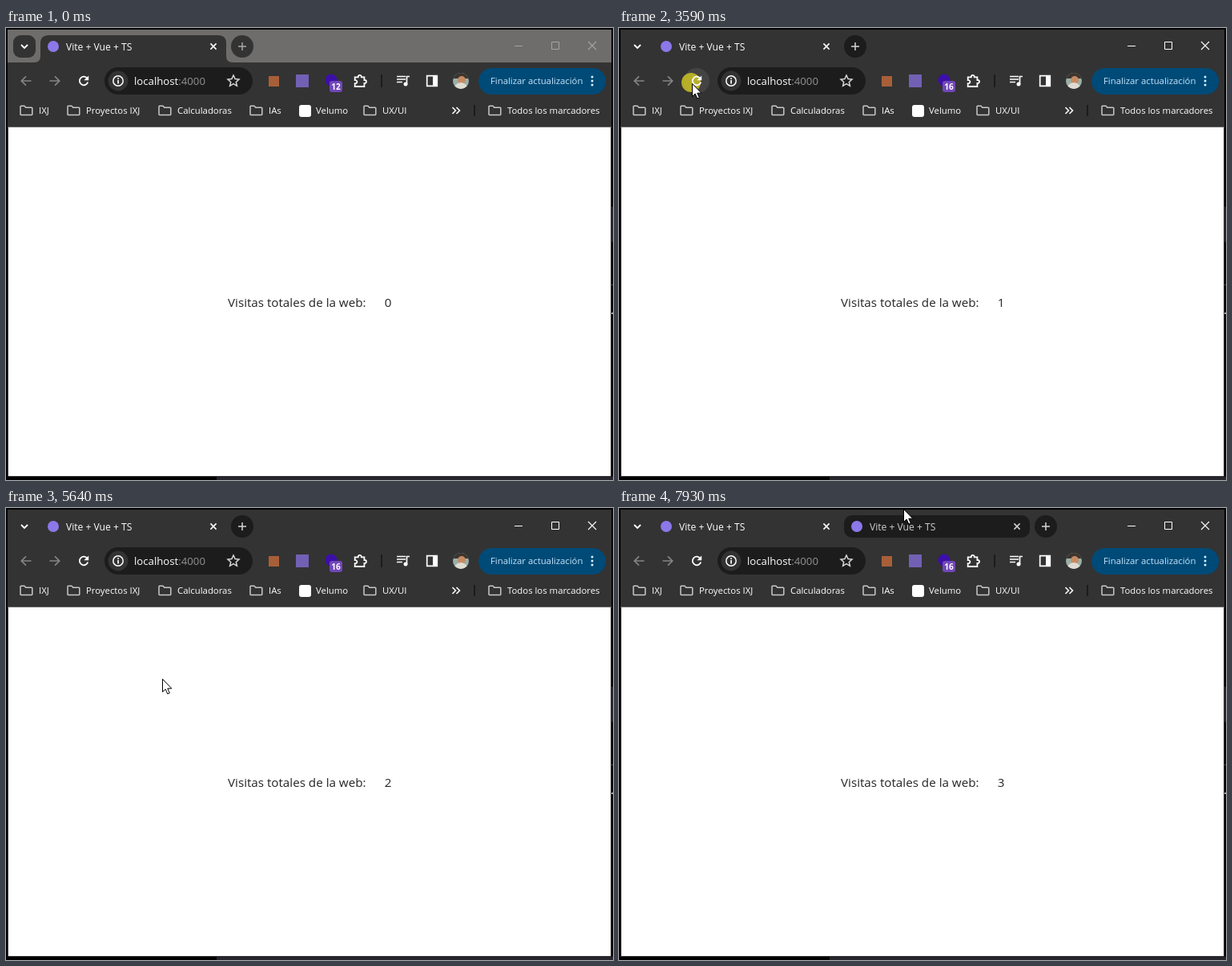
An HTML page with a canvas that plays this animation: 758 by 564 pixels, repeating every 8 s.

```html
<!DOCTYPE html>
<html lang="es">
<head>
<meta charset="utf-8">
<title>Contador de visitas</title>
<style>
html, body { margin: 0; width: 100%; height: 100%; overflow: hidden; background: #000; }
canvas { display: block; }
</style>
</head>
<body>
<canvas id="stage" width="758" height="564"></canvas>
<script>
const ctx = document.getElementById('stage').getContext('2d');
const LOOP = 8000;
const BAR = '#333333', DARK = '#1c1c1c', WHITE = '#ffffff', DIM = '#858585';
const UI = '11.35px "Open Sans", "Noto Sans", sans-serif';
const TITLE = '12.1px "Open Sans", "Noto Sans", sans-serif';
const ADDRESS = '13.2px "Open Sans", "Noto Sans", sans-serif';
const BODY = '15.2px "Open Sans", "Noto Sans", sans-serif';

// Pointer path: time, x, y
const POINTER = [
  [450, 630, 502], [640, 500, 410], [850, 346, 325], [1000, 370, 307],
  [1250, 485, 335], [1590, 212, 177], [1900, 100, 92], [2000, 80, 64],
  [2130, 91, 69], [4060, 91, 69], [4340, 104, 44], [4480, 116, 20],
  [4620, 128, 25], [4820, 128, 25], [4950, 150, 95], [5080, 185, 174],
  [5150, 190, 198], [5290, 195, 213], [6620, 195, 213], [6980, 172, 28],
  [7380, 166, 26], [7740, 166, 26], [7930, 355, 1]
];
const CLICKS = [2130, 3590, 5490, 7080];
const MENU = [
  ['Nueva pestaña a la derecha', 47], ['Añadir pestaña a lista de lectura', 75],
  ['Añadir pestaña al nuevo grupo', 103], ['Mover pestaña a otra ventana', 131],
  ['Volver a cargar', 176, 'Ctrl + R'], ['Duplicar', 204], ['Fijar', 232],
  ['Silenciar sitio', 260], ['Enviar a tus dispositivos', 305],
  ['Cerrar', 350, 'Ctrl + W'], ['Cerrar las demás pestañas', 378],
  ['Cerrar pestañas a la derecha', 406]
];
const BOOKMARKS = [
  ['IXJ', 17], ['Proyectos IXJ', 76], ['Calculadoras', 190], ['IAs', 304],
  ['UX/UI', 446], ['Todos los marcadores', 602]
];

const between = (t, a, b) => t >= a && t < b;
const clamp = v => Math.max(0, Math.min(1, v));

function rect(x, y, w, h, color) {
  ctx.fillStyle = color;
  ctx.fillRect(x, y, w, h);
}
function round(x, y, w, h, r, color) {
  ctx.fillStyle = color;
  ctx.beginPath();
  ctx.roundRect(x, y, w, h, r);
  ctx.fill();
}
function disc(x, y, r, color) {
  ctx.fillStyle = color;
  ctx.beginPath();
  ctx.arc(x, y, r, 0, Math.PI * 2);
  ctx.fill();
}
function ring(x, y, r, color, width) {
  ctx.strokeStyle = color;
  ctx.lineWidth = width;
  ctx.beginPath();
  ctx.arc(x, y, r, 0, Math.PI * 2);
  ctx.stroke();
}
function path(d, color, width, x = 0, y = 0) {
  ctx.save();
  ctx.translate(x, y);
  const shape = new Path2D(d);
  if (width) {
    ctx.strokeStyle = color;
    ctx.lineWidth = width;
    ctx.stroke(shape);
  } else {
    ctx.fillStyle = color;
    ctx.fill(shape);
  }
  ctx.restore();
}
function text(label, x, y, font = UI, color = WHITE, align = 'left') {
  ctx.font = font;
  ctx.fillStyle = color;
  ctx.textAlign = align;
  ctx.fillText(label, x, y);
}
const cross = (x, y, s, color, w) =>
  path(`M${-s} ${-s}L${s} ${s}M${s} ${-s}L${-s} ${s}`, color, w, x, y);

function pointerAt(t) {
  if (t < POINTER[0][0]) return null;
  const i = POINTER.findIndex(p => p[0] > t);
  if (i < 0) return POINTER[POINTER.length - 1].slice(1);
  const [t0, x0, y0] = POINTER[i - 1], [t1, x1, y1] = POINTER[i];
  const k = (t - t0) / (t1 - t0);
  return [x0 + (x1 - x0) * k, y0 + (y1 - y0) * k];
}

function visits(t) {
  if (t < 2800) return 0;
  if (t < 3880) return 1;
  if (t < 4040) return 0;
  if (t < 5790) return 2;
  return t < 6400 ? 0 : 3;
}

function stateAt(t) {
  const loading = between(t, 2270, 2700) || between(t, 3730, 3960) || between(t, 5790, 6250);
  return {
    focused: t >= 2130,
    loading,
    blank: between(t, 5790, 6130),
    hover: between(t, 2130, 4230),
    badge: t < 2270 ? '12' : loading || between(t, 5790, 6400) ? '' : '16',
    split: t < 5790 ? 0 : 1 - (1 - clamp((t - 5790) / 260)) ** 2,
    second: between(t, 5790, 7100),
    menu: between(t, 4820, 5490) ? 1 : between(t, 5490, 5640) ? 0.65 * (1 - (t - 5490) / 150) : 0,
    row: t < 5050 ? 0 : t < 5140 ? 176 : 204,
    count: visits(t)
  };
}

function drawFrame() {
  rect(0, 0, 758, 564, '#000');
  rect(263, 560, 495, 4, '#25252b');
  rect(756, 223, 2, 44, '#202026');
  rect(756, 320, 2, 1, '#44444a');
  rect(756, 355, 2, 2, '#a8a8a8');
}

function drawTab(x, active, focused, width = 232) {
  ctx.save();
  ctx.beginPath();
  ctx.rect(x - 8, 3, width + 16, 40);
  ctx.clip();
  if (!active) round(x, 9, width, 28, Math.min(10, width / 2), DARK);
  else if (!focused) {
    path('M-8 34Q0 34 0 26V10Q0 0 10 0H222Q232 0 232 10V26Q232 34 240 34Z', BAR, 0, x, 9);
  }
  ctx.beginPath();
  ctx.rect(x, 3, width, 40);
  ctx.clip();
  const ink = active ? WHITE : '#d0d0d0';
  if (width > 100) {
    disc(x + 16, 23, 7, '#8c78e8');
    text('Vite + Vue + TS', x + 32, 28, TITLE, ink);
  }
  cross(x + width - 16, 23, 3.6, ink, 1.5);
  ctx.restore();
}

function drawTitleBar(s) {
  rect(2, 2, 754, 41, s.focused ? BAR : '#6f6d6b');
  if (!s.focused) round(9, 9, 28, 28, 9, BAR);
  path('M-4 -2L0 2L4 -2', WHITE, 1.8, 23, 23);
  drawTab(43, !s.second, s.focused);
  if (s.split > 0.1) drawTab(281, s.second, true, 232 * s.split);
  const plus = 295 + 238 * s.split;
  if (between(s.split, 0, 0.1) && s.second) cross(278, 23, 3.3, WHITE, 1.5);
  disc(plus, 23, 14, s.focused ? DARK : BAR);
  path('M-5 0H5M0 -5V5', s.focused ? '#d5d5d5' : '#a9a9a9', 1.5, plus, 23);
  const ink = s.focused ? WHITE : '#a6a4a2';
  path('M-5 .5H5', ink, 1, 640, 22);
  path('M-4.5 -4.5H4.5V4.5H-4.5Z', ink, 1, 686, 22);
  cross(732, 22, 5, ink, 1.1);
}

function drawAvatar(x, y) {
  ctx.save();
  ctx.beginPath();
  ctx.arc(x, y, 10, 0, Math.PI * 2);
  ctx.clip();
  rect(x - 10, y - 10, 20, 20, '#9bb0aa');
  rect(x - 10, y - 10, 20, 7, '#3c342f');
  disc(x + 1, y - 1, 5, '#c68a62');
  disc(x, y + 11, 9, '#dedbd2');
  ctx.restore();
}

function drawToolbar(s) {
  rect(2, 43, 754, 81, BAR);
  const arrow = 'M6.5 0H-5.5M0 -5.7L-5.7 0L0 5.7';
  path(arrow, DIM, 1.7, 25, 66);
  path('M-6.5 0H5.5M0 -5.7L5.7 0L0 5.7', DIM, 1.7, 61, 66);
  if (s.hover) disc(97, 66, 16, '#444444');

  round(123, 49, 185, 34, 17, DARK);
  disc(140, 66, 12.5, BAR);
  ring(140, 66, 6.2, WHITE, 1.5);
  rect(139.2, 65, 1.7, 4.5, WHITE);
  rect(139.2, 62.3, 1.7, 1.7, WHITE);
  text('localhost', 160, 71, ADDRESS);
  const hostWidth = ctx.measureText('localhost').width;
  text(':4000', 160 + hostWidth, 71, ADDRESS, '#929292');
  path('M0 -7L2.1 -2.4L7 -1.9L3.3 1.4L4.4 6.3L0 3.7L-4.4 6.3L-3.3 1.4L-7 -1.9L-2.1 -2.4Z',
    '#d8d8d8', 1.5, 284, 66);

  round(328, 60, 13, 13, 0, '#a85f38');
  round(362, 58, 16, 16, 0, '#7260b5');
  disc(406, 65, 7.5, '#3c10a8');
  if (s.badge) {
    round(404, 66, 16, 14, 3, '#7247b8');
    text(s.badge, 412, 77, 'bold 10px "Open Sans", sans-serif', WHITE, 'center');
  }
  path('M-6.3 -4.6H-2.2V-5.2A2 2 0 0 1 1.8 -5.2V-4.6H5.4V-1H6A2 2 0 0 1 6 3H5.4V7H-6.3V3.2H-5.6A2 2 0 0 0 -5.6 -.8H-6.3Z',
    WHITE, 1.8, 442, 66);
  rect(468, 58, 2, 16, DARK);
  path('M-8 -5.5H3M-8 -2H3M-8 1.5H-1M4.5 4V-5.5H8', WHITE, 1.7, 496, 66);
  disc(499, 70, 2.5, WHITE);
  path('M-6.3 -6.3H6.3V6.3H-6.3Z', WHITE, 1.7, 532, 66);
  rect(533, 60, 6, 12, WHITE);
  drawAvatar(568, 66);

  round(590, 50, 159, 33, 16.5, '#004a77');
  text('Finalizar actualización', 605, 70, UI, '#c2e7ff');
  for (const y of [61, 66, 71]) disc(732, y, 1.5, '#d5efff');
}

function drawReload(loading) {
  if (loading) return cross(97, 66, 4.5, WHITE, 1.8);
  path('M4.6 -2.8A5.3 5.3 0 1 0 5.2 1.4', WHITE, 1.8, 97, 66);
  path('M6.2 -6.5V-.7H.4Z', WHITE, 0, 97, 66);
}

function drawBookmarks() {
  for (const [label, x] of BOOKMARKS) {
    path('M1 1.5Q1 .8 1.8 .8H6L7.8 2.7H15Q15.8 2.7 15.8 3.5V11.3Q15.8 12 15 12H1.8Q1 12 1 11.3Z',
      '#c8c8c8', 1.5, x, 96.5);
    text(label, x + 24, 107);
  }
  round(366, 96, 15, 15, 3, WHITE);
  text('Velumo', 387, 107);
  path('M-4.5 -4L-.5 0L-4.5 4M.5 -4L4.5 0L.5 4', WHITE, 1.6, 562, 103);
  rect(584, 96, 2, 14, DARK);
  rect(2, 123, 754, 1, '#686868');
}

function drawPage(s) {
  rect(2, 124, 754, 435, s.blank ? BAR : WHITE);
  rect(2, 124, 1, 435, '#444');
  rect(755, 124, 1, 435, '#444');
  rect(2, 559, 754, 1, '#333');
  if (s.blank) return;
  text('Visitas totales de la web:', 277, 348, BODY, '#252525');
  text(s.count, 477, 348, BODY, '#252525', 'center');
}

function drawMenu(alpha, row) {
  if (!alpha) return;
  ctx.save();
  ctx.globalAlpha = alpha;
  ctx.shadowColor = 'rgba(0,0,0,.4)';
  ctx.shadowBlur = 14;
  ctx.shadowOffsetY = 5;
  round(128, 24, 291, 403, 8, '#1f1f1f');
  ctx.shadowColor = 'transparent';
  if (row) rect(128, row - 15, 291, 28, '#373635');
  for (const y of [152, 281, 326]) rect(128, y, 291, 1, '#5c5c5c');
  for (const [label, y, keys] of MENU) {
    text(label, 176, y + 4, UI, y > 360 ? '#8c8f92' : '#ececec');
    if (keys) text(keys, 398, y + 4, UI, '#d5d5d5', 'right');
  }
  path('M0 -4L5 0L0 4Z', '#a8a8a8', 0, 393, 130);
  path('M-5 2.5V-4.5H6M-7.5 4H1M2.5 -2.5H7V4H2.5Z', '#b5b5b5', 1.3, 155, 304);
  ctx.restore();
}

function drawPointer(t) {
  const point = pointerAt(t);
  if (!point) return;
  const [x, y] = point;
  path('M.5 .5V16.5L4.2 13.1L6.8 19L9.3 17.9L6.8 12.2H11.8Z', WHITE, 0, x, y);
  path('M.5 .5V16.5L4.2 13.1L6.8 19L9.3 17.9L6.8 12.2H11.8Z', '#000', 1, x, y);
}

function draw(t) {
  const s = stateAt(t);
  drawFrame();
  drawTitleBar(s);
  drawToolbar(s);
  drawBookmarks();
  drawPage(s);
  drawMenu(s.menu, s.row);
  const clicked = CLICKS.some(c => between(t, c, c + 140));
  if (clicked) {
    const [x, y] = pointerAt(t);
    disc(x - 1, y - 1, 12, 'rgba(205,194,36,.85)');
  }
  if (!s.menu || s.menu < 1) drawReload(s.loading);
  else drawReload(false);
  drawPointer(t);
}

function tick() {
  draw(performance.now() % LOOP);
  requestAnimationFrame(tick);
}
tick();
</script>
</body>
</html>
```
